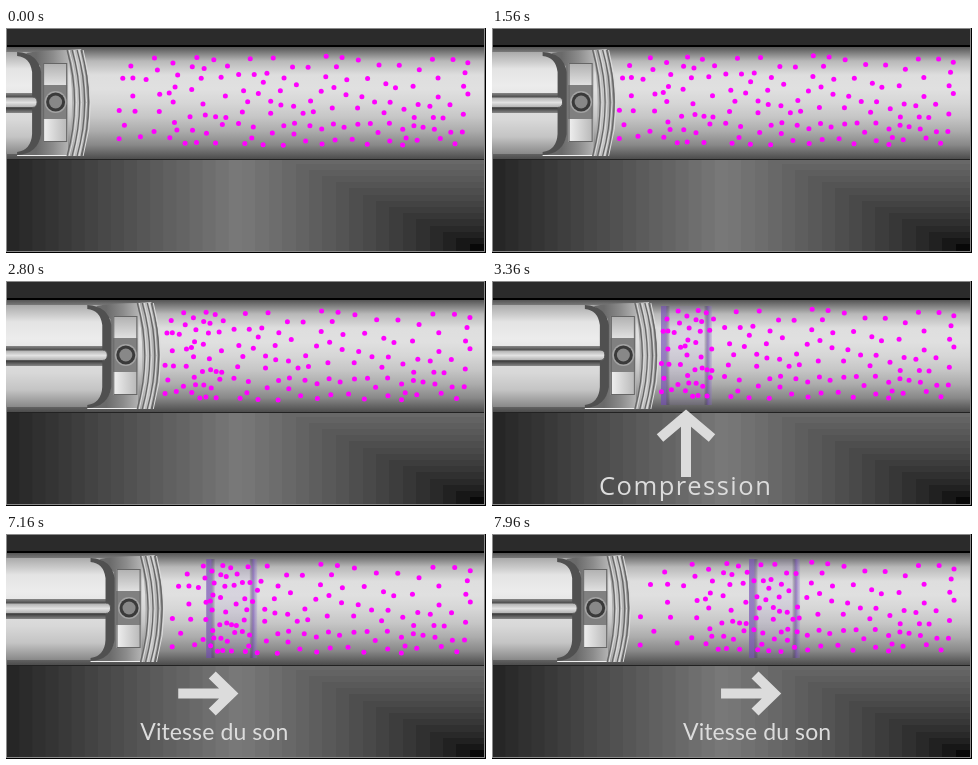
Write an HTML page with a canvas that moves like this. It is 480x225 px and loops after 8 s.

```html
<!DOCTYPE html>
<html lang="fr">
<head>
<meta charset="utf-8">
<title>Compression</title>
<style>
html, body { margin: 0; width: 100%; height: 100%; overflow: hidden; background: #000; }
canvas { display: block; }
</style>
</head>
<body>
<canvas id="stage" width="480" height="225"></canvas>
<script>
const ctx = document.getElementById('stage').getContext('2d');
const LOOP = 8000, HOLD = 3360, RESUME = 6360, STEP = 40;
const INK = '#dcdcdc';
const GAS_START = 112, BAND_START = 169, BAND_WIDTH = 51;

const gray = v => `rgb(${v},${v},${v})`;
const lerp = (a, b, k) => a + (b - a) * k;
const ramp = (from, to, x) => Math.min(1, Math.max(0, (x - from) / (to - from)));

function rect(x, y, w, h, fill) {
  ctx.fillStyle = fill;
  ctx.fillRect(x, y, w, h);
}

// Linear gradient with evenly spaced colours.
function gradient(x0, y0, x1, y1, ...colors) {
  const g = ctx.createLinearGradient(x0, y0, x1, y1);
  colors.forEach((color, i) => g.addColorStop(i / (colors.length - 1), color));
  return g;
}

function shape(d, fill, stroke, width = 1) {
  const path = new Path2D(d);
  if (fill) { ctx.fillStyle = fill; ctx.fill(path); }
  if (stroke) { ctx.strokeStyle = stroke; ctx.lineWidth = width; ctx.stroke(path); }
}

function disc(x, y, r, fill) {
  ctx.beginPath();
  ctx.arc(x, y, r, 0, 7);
  ctx.fillStyle = fill;
  ctx.fill();
}

// Evenly scattered gas: each particle goes to the emptiest of a few random places.
let seed = 7;
const random = () => (seed = seed * 16807 % 2147483647) / 2147483647;
const dots = [];
const gap = (x, y) => Math.min(...dots.map(d => Math.hypot(d.x - x, d.y - y)));
while (dots.length < 138) {
  let best, widest = -1;
  for (let i = 0; i < 8; i++) {
    const x = lerp(GAS_START + 1, 464, random()), y = lerp(28, 118, random());
    const g = gap(x, y);
    if (g > widest) { widest = g; best = { x, y }; }
  }
  dots.push(best);
}

// The piston moves at a steady speed and turns round smoothly.
const pistonOffset = s => 91.5 - Math.hypot(8, 25.5 * (s - 3.57));
const waveShift = s => Math.max(0, s - 3.76) * 71;

// Where gas resting at x is now: rarefied behind the band, squeezed inside it.
function displace(x, s) {
  const shift = waveShift(s);
  const front = Math.max(GAS_START, 87 + pistonOffset(s));
  const left = shift ? BAND_START + shift : front;
  const right = BAND_START + shift + BAND_WIDTH;
  const density = lerp(2.12, 1.65, ramp(3.76, 5, s));
  const tail = right - BAND_WIDTH * density;
  if (x > right) return x;
  if (x > tail) return lerp(left, right, (x - tail) / (right - tail));
  return lerp(front, left, ramp(GAS_START, tail, x) ** 0.6);
}

function drawGas(s) {
  const phase = Math.sin(2 * Math.PI * Math.min(s, 6.72 - s) / 3.36);
  for (const { x, y } of dots) {
    const dx = 1 + 5 * Math.sin((x - 150) / 80), dy = -2;
    disc(displace(x, s) + dx * phase, y + dy * phase, 2.5, '#f0f');
  }
}

function drawBackground() {
  rect(0, 0, 480, 225, '#000');
  rect(0, 0, 478, 17, '#2b2b2b');
  rect(0, 19, 478, 112, gradient(0, 19, 0, 131,
    '#555', '#b8b8b8', '#dedede', '#e0e0e0', '#d6d6d6', '#c6c6c6', '#acacac', '#888', '#4c4c4c'));
  rect(0, 131, 478, 1, '#222');
  for (let i = 0; i < 18; i++) {
    rect(i * 13.1, 132, 245, 91, gray(Math.round(38 + i * 4.8)));
  }
  for (let i = 0; i < 18; i++) {
    const x = Math.round(236 + i * 13.4), y = Math.max(132, Math.round(222 - (477 - x) / 2.17));
    rect(x, y, 478 - x, 223 - y, gray(Math.round(8 + 110 * (1 - i / 17) ** 0.7)));
  }
  ctx.strokeStyle = '#8a8a8a';
  ctx.lineWidth = 1;
  ctx.strokeRect(0.5, 0.5, 478, 223);
}

function drawPiston(offset) {
  // Open cylinder and rod
  rect(0, 24, offset + 26, 102, gradient(0, 24, 0, 126,
    '#aaa', '#e4e4e4', '#ececec', '#e0e0e0', '#d8d8d8', '#c4c4c4', '#888'));
  rect(0, 65, offset + 28, 20, gradient(0, 65, 0, 85, '#888', '#3c3c3c', '#3c3c3c', '#3c3c3c', '#888'));
  ctx.save();
  ctx.translate(offset, 0);
  // Body and skirt
  shape('M20 25 Q34 22 62 22 V127 H12 Q30 124 34 110 V38Z',
    gradient(30, 0, 64, 0, '#6a6a6a', '#8c8c8c', '#b8b8b8'));
  shape('M11 24 Q32 25 35 44 V106 Q32 126 11 127 V124 Q25 122 26 106 V44 Q24 29 11 28Z', '#505050');
  shape('M11 127.500 H66', null, '#eee');
  shape('M-120 69 H26 Q31 69 31 74 Q31 79.500 26 79.500 H-120Z',
    gradient(0, 69, 0, 80, '#aaa', '#e2e2e2', '#aaa'), '#555');
  // Pin block
  rect(37, 35, 24, 79, '#808080');
  rect(37, 35, 24, 22, gradient(0, 35, 0, 57, '#b0b0b0', '#e0e0e0'));
  rect(37, 91, 24, 23, gradient(37, 0, 61, 0, '#f0f0f0', '#b8b8b8'));
  ctx.strokeStyle = '#666';
  ctx.lineWidth = 1;
  ctx.strokeRect(37.5, 35.5, 23, 78);
  disc(49.5, 74, 11, '#a4a4a4');
  disc(49.5, 74, 9.5, '#3a3a3a');
  disc(49.5, 74, 6.5, '#888');
  // Rings and crown
  shape('M61 22 Q71 74 61 128 H75 Q92 74 75 21Z', gradient(61, 0, 84, 0, '#999', '#c8c8c8', '#8c8c8c'));
  for (const x of [61, 66, 71, 75]) {
    shape(`M${x} 22 Q${x + 15} 74 ${x} 128`, null, '#666', 1.3);
    shape(`M${x + 2} 22 Q${x + 17} 74 ${x + 2} 128`, null, '#dcdcdc');
  }
  ctx.restore();
}

function drawBand(x, alpha) {
  const edge = 'rgba(112,72,178,.6)', soft = 'rgba(140,110,200,.1)';
  ctx.globalAlpha = alpha;
  rect(x, 25, BAND_WIDTH, 99, soft);
  rect(x, 25, 9, 99, gradient(x, 0, x + 9, 0, edge, edge, 'transparent'));
  const right = x + BAND_WIDTH;
  rect(right - 8, 25, 8, 99, gradient(right - 8, 0, right, 0, 'transparent', edge, soft));
  ctx.globalAlpha = 1;
}

function drawLabel(text, font, spacing, x, y, arrow, alpha) {
  ctx.save();
  ctx.globalAlpha = alpha;
  ctx.translate(x, 0);
  shape(arrow, null, INK, 10);
  ctx.font = font;
  ctx.letterSpacing = spacing;
  ctx.fillStyle = INK;
  ctx.fillText(text, 0, y);
  ctx.restore();
}

function draw(t) {
  const s = (t < RESUME ? Math.min(t, HOLD) : t - 2960) / 1000;
  const shift = waveShift(s), appear = ramp(2.9, 3.36, s);
  drawBackground();
  drawPiston(pistonOffset(s));
  drawBand(BAND_START + shift, appear);
  drawGas(s);
  drawLabel('Compression', '25.5px "Open Sans", sans-serif', '1.5px', 107, 214,
    'M61 157 L87 135 L113 157 M87 137 V196', appear * (1 - ramp(3.36, 3.72, s)));
  drawLabel('Vitesse du son', '23px Lato, sans-serif', '0.1px', 103 + shift, 206,
    'M72 141 L91 159.500 L72 178 M38 159.500 H89', ramp(3.76, 4.1, s));
}

function frame() {
  draw(Math.floor(performance.now() % LOOP / STEP) * STEP);
  requestAnimationFrame(frame);
}
frame();
</script>
</body>
</html>
```
